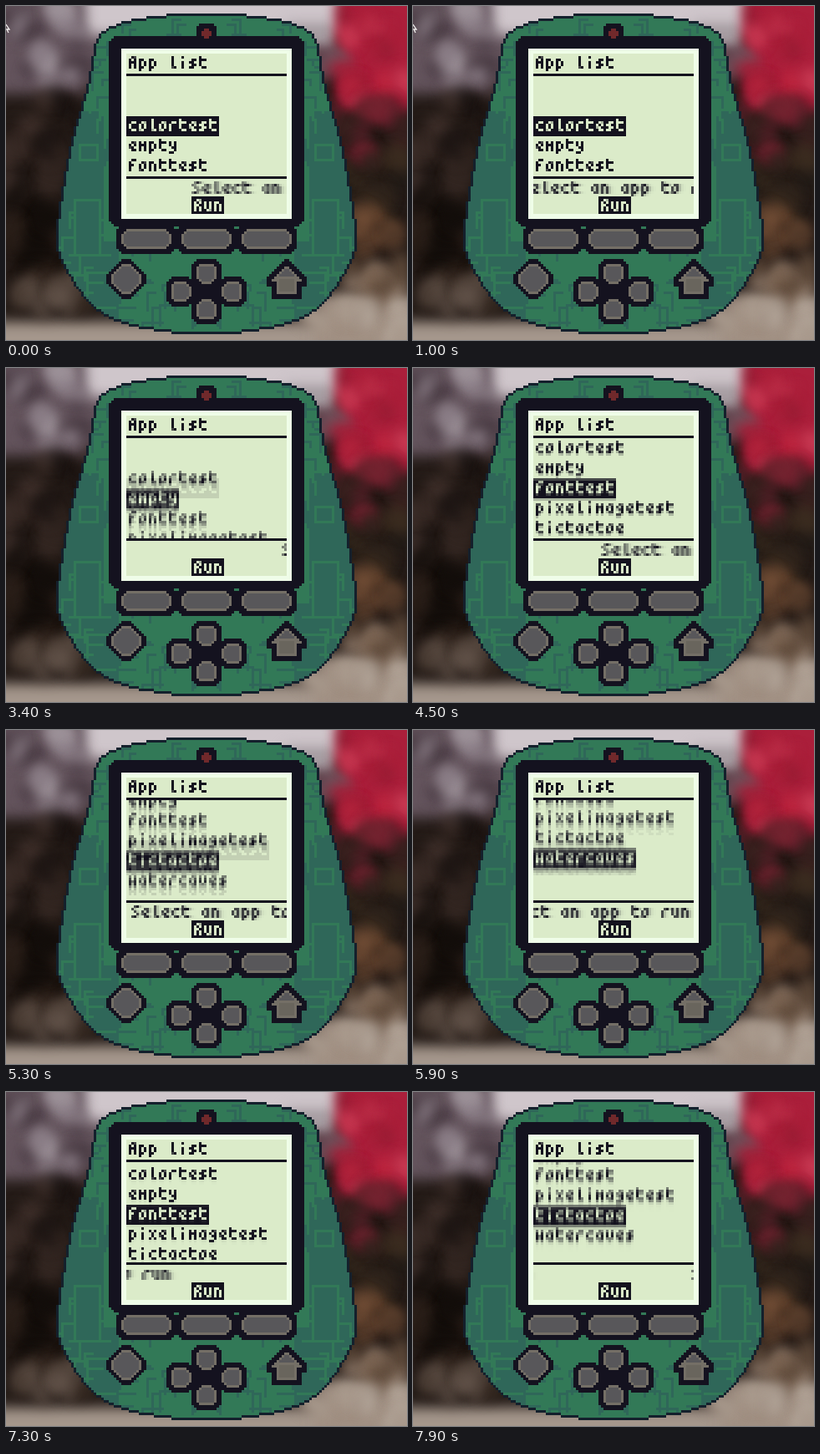
An HTML page with a canvas that plays this animation: 480 px wide and 400 px high, repeating every 8 s.

```html
<!DOCTYPE html>
<html lang="en">
<head>
<meta charset="utf-8">
<title>App list</title>
<style>
  html, body { margin: 0; width: 100%; height: 100%; overflow: hidden; background: #2a231f; }
  canvas { display: block; width: 480px; height: 400px; }
</style>
</head>
<body>
<canvas id="stage" width="480" height="400" role="img" aria-label="Handheld device showing an app list: Select an app to run"></canvas>
<script>
const LOOP = 8000, TICK = 1000 / 60, CELL = 3, POINTER_GONE = 3000;
const INK = '#14121f', PAPER = '#dbebc9', GREEN = '#327957', TEAL = '#2f6759';
const GREY = '#58575a', RIM = '#746f66';
const APPS = ['colortest', 'empty', 'fonttest', 'pixelimagetest', 'tictactoe', 'watercaves'];
const HINT = 'Select an app to run';
// Each press of the down key moves the selection one item on, wrapping at the end.
const PRESSES = [3360, 4270, 4800, 5260, 5850, 6320, 6830, 7130, 7450, 7780];

// Strokes of a 3 x 6 pixel typeface
const GLYPHS = {
  A: 'M1 0h1v4M0 1v3M0 2h2',
  S: 'M1 0h1M0 1h.01M1 2h.01M2 3h.01M0 4h1',
  R: 'M1 0h1v1M0 1v3M0 2h1M2 3v1',
  a: 'M1 1h1v3h-1M0 2v1',
  c: 'M1 1h1M0 2v1M1 4h1',
  e: 'M1 1h1v1M0 2v1h1M1 4h1',
  f: 'M1 0h1M0 1v3M0 2h1',
  g: 'M1 1h1v3M0 2h.01M1 3h1M0 5h1',
  i: 'M1 0h.01M1 2v2',
  l: 'M1 0v4h1',
  m: 'M0 1v3M2 1v3M0 2h2',
  n: 'M0 1v3M0 1h1M2 2v2',
  o: 'M1 1h1v2M0 2v2h1',
  p: 'M0 1v4M0 1h1M2 2v1M0 4h1',
  r: 'M1 1h1M0 2v2',
  s: 'M1 1h1M0 2h1M1 3h1M0 4h1',
  t: 'M0 0v3M0 1h2M1 4h1',
  u: 'M0 1v2M2 1v3h-1',
  v: 'M0 1v2M2 1v2M1 4h.01',
  w: 'M0 1v3M2 1v3M0 3h2',
  x: 'M0 1h.01M2 1h.01M1 2v1M0 4h.01M2 4h.01',
  y: 'M0 1v1M2 1v3M1 3h1M0 5h1'
};
GLYPHS.R += 'M0 4h.01';
for (const ch in GLYPHS) GLYPHS[ch] = new Path2D(GLYPHS[ch]);

function layer(w, h) {
  const canvas = document.createElement('canvas');
  canvas.width = w;
  canvas.height = h;
  return canvas.getContext('2d');
}

function seeded(seed) {
  return () => (seed = (seed * 16807) % 2147483647) / 2147483647;
}

function box(g, color, x, y, w, h) {
  g.fillStyle = color;
  g.fillRect(x, y, w, h);
}

// Box with stepped pixel corners
function softBox(g, color, x, y, w, h, cut = 1) {
  for (let i = 0; i <= cut; i++) box(g, color, x + cut - i, y + i, w - 2 * (cut - i), h - 2 * i);
}

// Fill the cells around a centre whose middle satisfies a test
function cells(g, color, cx, cy, reach, test) {
  for (let y = -reach; y < reach; y++)
    for (let x = -reach; x < reach; x++)
      if (test(x + .5, y + .5)) box(g, color, cx + x, cy + y, 1, 1);
}

function paintBackdrop() {
  const g = layer(480, 400), rnd = seeded(77);
  const blobs = (x, y, w, h, size, count, colors) => {
    for (let i = 0; i < count; i++) {
      g.fillStyle = colors[Math.floor(rnd() * colors.length)];
      g.beginPath();
      g.ellipse(x + rnd() * w, y + rnd() * h, size * (.6 + rnd() * .7), size * (.4 + rnd() * .6), rnd() * 3, 0, 7);
      g.fill();
    }
  };
  box(g, '#241b17', 0, 0, 480, 400);
  g.filter = 'blur(8px)';
  box(g, '#64545d', -20, -20, 160, 125);
  box(g, '#cfc6cb', 95, -20, 310, 55);
  box(g, '#a9a0a5', 335, 20, 60, 45);
  box(g, '#ab1f3b', 396, -20, 110, 145);
  box(g, '#a5978c', -20, 378, 520, 50);
  box(g, '#a08f82', 370, 345, 140, 70);
  blobs(0, 0, 105, 100, 15, 22, ['#8b7e87', '#5b4a53', '#493b43', '#9d9299']);
  blobs(0, 100, 110, 120, 16, 24, ['#211815', '#30241f', '#3e2f2a', '#1b1412']);
  blobs(0, 215, 65, 110, 18, 18, ['#1c1410', '#291e18', '#120d0a']);
  blobs(0, 325, 95, 40, 16, 12, ['#4a3c33', '#342820', '#62534a']);
  blobs(360, 45, 40, 60, 14, 9, ['#70545e', '#8f5364', '#5a3c45']);
  blobs(402, 0, 78, 120, 14, 22, ['#c0263f', '#8f1b31', '#c93a53', '#a91d37']);
  blobs(385, 115, 95, 65, 16, 16, ['#591f29', '#752330', '#3a211f']);
  blobs(398, 180, 82, 75, 16, 18, ['#2c221b', '#3c2d20', '#211c17']);
  blobs(412, 250, 68, 45, 15, 12, ['#62432f', '#4a3426', '#795238']);
  blobs(410, 305, 70, 40, 17, 12, ['#5a4637', '#78614f', '#8d7868']);
  blobs(360, 360, 120, 35, 17, 10, ['#a99a8d', '#b7aa9e', '#8e7e72']);
  return g.canvas;
}

// Row and half width of the shell, from top to bottom
const OUTLINE = [[3, 16], [4, 24], [5, 30], [6, 34], [8, 38.5], [10, 42], [13, 44], [17, 45], [23, 46],
  [33, 48], [43, 51], [53, 54], [63, 56], [73, 57.7], [82, 59.3], [90, 60], [97, 59.6], [102, 58],
  [107, 55], [112, 52], [117, 48], [121, 43.5], [124, 39], [126, 34], [128, 27], [130, 14]];

function halfWidth(y) {
  const i = OUTLINE.findIndex(p => p[0] >= y);
  if (i < 0 || y < OUTLINE[0][0]) return 0;
  if (i === 0) return OUTLINE[0][1];
  const [y0, w0] = OUTLINE[i - 1], [y1, w1] = OUTLINE[i];
  return Math.round(w0 + (w1 - w0) * (y - y0) / (y1 - y0));
}

function paintTraces(g) {
  const rnd = seeded(4211);
  const mirrored = (color, x, y, w, h) => {
    box(g, color, 80 - x - w, y, w, h);
    box(g, color, 80 + x, y, w, h);
  };
  const ring = (x, y, w, h) => {
    mirrored(GREEN, x, y, w, h);
    mirrored(TEAL, x + 1, y + 1, w - 2, h - 2);
  };
  mirrored(TEAL, 41, 42, 20, 52);
  mirrored(TEAL, 35, 94, 25, 36);
  for (let i = 0; i < 90; i++) {
    const x = Math.floor(rnd() * 58), y = 5 + Math.floor(rnd() * 122), run = 3 + Math.floor(rnd() * 8);
    const color = x > 34 && y > 40 ? GREEN : TEAL;
    mirrored(color, x, y, run, 1);
    mirrored(color, x + run - 1, y, 1, 2 + Math.floor(rnd() * 8));
  }
  ring(42, 77, 11, 23);
  ring(43, 55, 8, 7);
  mirrored(GREEN, 38, 99, 17, 1);
}

function paintShell() {
  const g = layer(160, 134);
  const rows = [];
  for (let y = 3; y <= 130; y++) rows.push([y, halfWidth(y)]);
  for (const [y, w] of rows) box(g, GREEN, 80 - w, y, 2 * w, 1);
  g.globalCompositeOperation = 'source-atop';
  paintTraces(g);
  g.globalCompositeOperation = 'source-over';
  for (const [y, w] of rows) {
    const inner = Math.min(w - 1, halfWidth(y - 1), halfWidth(y + 1));
    box(g, '#14202c', 80 - w, y, w - inner, 1);
    box(g, '#14202c', 80 + inner, y, w - inner, 1);
  }

  softBox(g, INK, 76, 7, 8, 7);
  softBox(g, INK, 41, 12, 78, 76, 2);
  box(g, '#70292b', 78, 10, 4, 2);
  box(g, '#70292b', 79, 9, 2, 4);
  box(g, '#effde8', 46, 17, 68, 68);

  for (const x of [46, 70, 94]) {
    softBox(g, INK, x - 2, 87, 24, 12, 2);
    softBox(g, RIM, x, 89, 20, 8, 2);
    softBox(g, GREY, x + 1, 90, 18, 6);
  }

  // Blunt tips come from the reach, slanted sides from the sum.
  const diamond = (color, reach) =>
    cells(g, color, 48, 109, reach, (x, y) => Math.abs(x) + Math.abs(y) <= reach + 1);
  diamond(INK, 8);
  diamond(RIM, 6);
  diamond(GREY, 5);

  // Each pad tapers towards the middle of the cross.
  const pads = [[0, -1], [0, 1], [-1, 0], [1, 0]];
  const padLayer = (color, reach, slope) => pads.forEach(([dx, dy]) =>
    cells(g, color, 80 + dx * 10, 114 + dy * 7, reach, (x, y) =>
      Math.abs(x) + Math.abs(y) <= (x * dx + y * dy > 0 ? slope : slope - 1)));
  box(g, INK, 75, 109, 10, 10);
  padLayer(INK, 6, 9);
  padLayer(RIM, 4, 6);
  padLayer(GREY, 3, 5);

  const home = (color, grow) => cells(g, color, 112, 109, 9, (x, y) =>
    (y > -6 - grow && y < 1 + grow && Math.abs(x) <= y + 5.5 + 1.5 * grow && Math.abs(x) < 6 + grow) ||
    (y >= 0 && y < 6 + grow && Math.abs(x) < 4 + grow));
  home(INK, 2);
  home(RIM, 0);
  home(GREY, -1);
  box(g, RIM, 108, 108, 8, 7);
  box(g, '#69655d', 109, 109, 6, 5);
  return g.canvas;
}

function write(g, color, text, x, y) {
  g.strokeStyle = color;
  g.lineWidth = 1;
  g.lineCap = 'square';
  [...text].forEach((ch, i) => {
    if (!GLYPHS[ch]) return;
    g.setTransform(1, 0, 0, 1, x + i * 4 + .5, y + .5);
    g.stroke(GLYPHS[ch]);
  });
  g.resetTransform();
}

function label(g, text, x, y, h) {
  box(g, INK, x, y, text.length * 4 + 1, h);
  write(g, PAPER, text, x + 1, y + 1);
}

function selectionAt(t) {
  const count = PRESSES.filter(p => p <= t).length;
  const selected = count % APPS.length;
  if (!count) return { selected, shift: 0 };
  const previous = (count - 1) % APPS.length;
  const steps = Math.floor((t - PRESSES[count - 1]) / TICK) + 1;
  return { selected, shift: Math.round((selected - previous) * 8 * .8 ** steps) };
}

function paintScreen(g, t) {
  const { selected, shift } = selectionAt(t);
  box(g, PAPER, 0, 0, 64, 64);
  g.save();
  g.beginPath();
  g.rect(0, 9, 64, 40);
  g.clip();
  APPS.forEach((name, i) => {
    const y = 25 + (i - selected) * 8 + shift;
    if (i === selected) label(g, name, 0, y, 8);
    else write(g, INK, name, 1, y + 1);
  });
  g.restore();
  write(g, INK, 'App list', 1, 1);
  box(g, INK, 0, 8, 64, 1);
  box(g, INK, 0, 49, 64, 1);
  const travel = ((t + 1200) * .0318) % (64 + HINT.length * 4);
  write(g, INK, HINT, Math.ceil(64 - travel), 51);
  label(g, 'Run', 26, 57, 7);
}

const stage = document.getElementById('stage').getContext('2d');
const screen = layer(64, 64);
const still = layer(480, 400);
const pointer = new Path2D('M0 22L4 28H1L3 32');
still.drawImage(paintBackdrop(), 0, 0);
still.imageSmoothingEnabled = false;
still.drawImage(paintShell(), 0, 0, 160 * CELL, 134 * CELL);

function render(t) {
  stage.drawImage(still.canvas, 0, 0);
  if (t < POINTER_GONE) {
    stage.strokeStyle = '#f2f0ee';
    stage.lineWidth = 1.3;
    stage.stroke(pointer);
  }
  if (PRESSES.some(p => t >= p - 100 && t < p)) {
    softBox(stage, '#3e3d42', 231, 354, 18, 18, 3);
  }
  // Slow liquid crystals: earlier states fade under the current one.
  stage.imageSmoothingEnabled = false;
  for (let age = 7; age >= 0; age--) {
    paintScreen(screen, t - age * TICK);
    stage.globalAlpha = age === 7 ? 1 : .5;
    stage.drawImage(screen.canvas, 144, 57, 64 * CELL, 64 * CELL);
  }
  stage.globalAlpha = 1;
}

const start = performance.now();
function frame() {
  render((performance.now() - start) % LOOP);
  requestAnimationFrame(frame);
}
frame();
</script>
</body>
</html>
```
